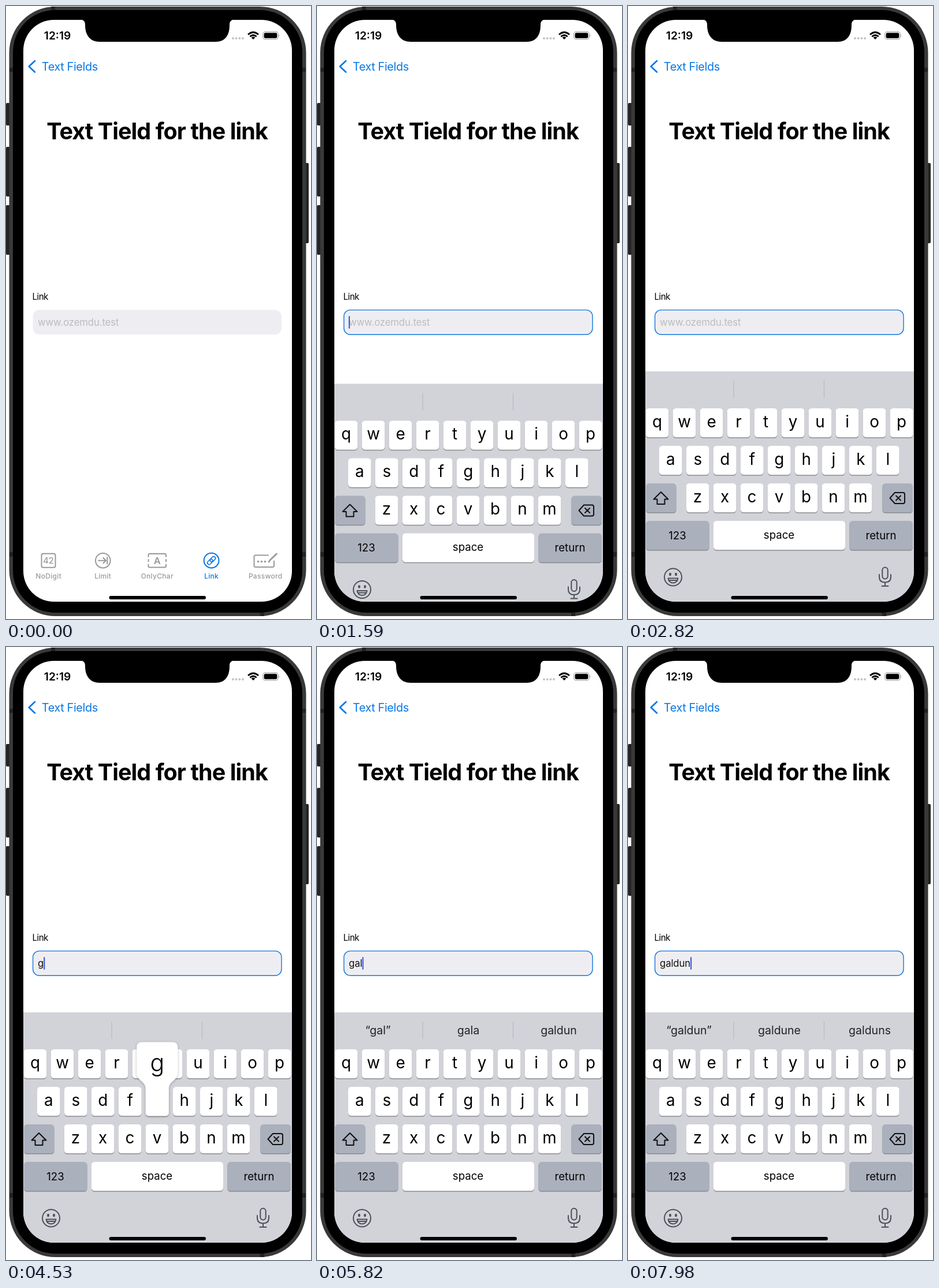
These frames come from a looping animation (528 by 1062 pixels, 8 s). An HTML page:

```html
<!DOCTYPE html>
<html lang="en">
<head>
<meta charset="utf-8">
<title>Link field</title>
<style>
  html, body { margin: 0; width: 100%; height: 100%; overflow: hidden; background: #fff; }
  svg { display: block; width: 100vw; height: 100vh; }
  text { font-family: Inter, Roboto, sans-serif; font-optical-sizing: none; white-space: pre; }
  .mid { text-anchor: middle; }
  .line { fill: none; stroke-linecap: round; stroke-linejoin: round; }
  .title { font-size: 39.5px; font-weight: 700; letter-spacing: -.94px; }
  .back { font-size: 19.8px; letter-spacing: -.35px; fill: #0877e6; }
  .input { font-size: 16.7px; letter-spacing: -.1px; }
  .tab { font-size: 12px; font-weight: 500; letter-spacing: .3px; }
  .key { font-size: 27.8px; font-weight: 400; }
  .word { font-size: 18.6px; }
  .hint { font-size: 19.5px; fill: #222; }
</style>
</head>
<body>
<svg viewBox="0 0 528 1062" preserveAspectRatio="none">
  <defs>
    <clipPath id="screen"><rect x="30" y="24" width="465" height="1008" rx="53"/></clipPath>
    <filter id="soft" x="-30%" y="-30%" width="160%" height="160%">
      <feDropShadow dx="0" dy="1" stdDeviation="2" flood-color="#000" flood-opacity=".3"/>
    </filter>
  </defs>

  <!-- phone body -->
  <g fill="#242424">
    <rect x="0" y="168" width="9" height="39" rx="2"/>
    <rect x="0" y="244" width="9" height="86" rx="2"/>
    <rect x="0" y="345" width="9" height="86" rx="2"/>
    <rect x="515" y="272" width="9" height="139" rx="2"/>
  </g>
  <rect x="5.5" y="1" width="514" height="1056" rx="80" fill="#393939"/>
  <path d="M6 107h7v7h-7zM6 946h7v8h-7zM512 107h7v7h-7zM512 946h7v8h-7zM78 1h7v6h-7zM440 1051h7v6h-7z" fill="#222"/>
  <rect x="12" y="7" width="501" height="1044" rx="73"/>
  <rect x="30" y="24" width="465" height="1008" rx="53" fill="#fff"/>
  <path d="M128 23C134.500 24 137 26.500 137 33C137 51 146 62 162 62H363C379 62 387 51 387 33C387 26.500 389.500 24 396 23z"/>

  <!-- status bar -->
  <text x="65.800" y="58" font-size="19.200" font-weight="600">12:19</text>
  <g fill="#c4c4c6">
    <circle cx="393" cy="56" r="2"/><circle cx="398.700" cy="56" r="2"/>
    <circle cx="404.400" cy="56" r="2"/><circle cx="410" cy="56" r="2"/>
  </g>
  <g fill="none" stroke="#000" stroke-width="2.700">
    <path d="M419 49.500Q428 41.500 437 49.500M422.300 53Q428 48 433.700 53"/>
  </g>
  <path d="M428 58l-3.400-3.500Q428 52 431.400 54.500z"/>
  <rect x="444.700" y="44.700" width="26.500" height="13" rx="4" fill="none" stroke="#a5a5a7" stroke-width="1.200"/>
  <rect x="446.600" y="46.600" width="22.700" height="9.200" rx="2.300"/>
  <path d="M472.500 49q2 2.200 0 4.500z" fill="#a5a5a7"/>

  <!-- page -->
  <path class="line" d="M50 95L39.700 104.700L50 114.400" stroke="#0877e6" stroke-width="2.700"/>
  <text class="back" x="61.800" y="112">Text Fields</text>
  <text class="title mid" x="261.500" y="231">Text Tield for the link</text>
  <text x="45.500" y="509" font-size="15.200" letter-spacing="-.55">Link</text>
  <rect id="field" x="46.600" y="526.600" width="430.400" height="42.600" rx="11" fill="#eeeef2" stroke-width="1.400"/>
  <text id="input" class="input" x="55" y="554"></text>
  <rect id="caret" y="537" width="2.200" height="22" rx="1" fill="#3f62d6"/>

  <!-- tab bar -->
  <g class="line" stroke="#999" stroke-width="2">
    <rect x="61.500" y="948.700" width="24" height="24" rx="3"/>
    <circle cx="167.800" cy="960.700" r="12.800"/>
    <path d="M160 960.700h13M168.300 956l4.700 4.700l-4.700 4.700M175.300 955v11.500"/>
    <path d="M246.500 954v-3q0-2 2-2h26.500q2 0 2 2v3M246.500 967.500v3q0 2 2 2h26.500q2 0 2-2v-3M246.500 959v3.500M277 959v3.500"/>
    <path d="M454 951.500h-22q-2.500 0-2.500 2.500v15.500q0 2.500 2.500 2.500h29.500q2.500 0 2.500-2.500v-8"/>
    <path d="M455 963l2.500-3.500l11-10.500" stroke-width="2.800"/>
  </g>
  <g class="line" stroke="#0877e6" stroke-width="2">
    <circle cx="355.600" cy="960.700" r="12.900"/>
    <g transform="translate(355.600 960.700) rotate(-45)" stroke-width="1.600">
      <rect x="-8.500" y="-3" width="10.500" height="6" rx="3"/>
      <rect x="-2" y="-3" width="10.500" height="6" rx="3"/>
    </g>
  </g>
  <g fill="#999" class="mid">
    <text x="73.500" y="966" font-size="14.500" font-weight="500">42</text>
    <text x="261.700" y="966.500" font-size="16.500" font-weight="600">A</text>
    <circle cx="436.500" cy="962.500" r="1.800"/><circle cx="442.500" cy="962.500" r="1.800"/><circle cx="448.500" cy="962.500" r="1.800"/>
    <text class="tab" x="73.700" y="992">NoDigit</text>
    <text class="tab" x="167.700" y="992">Limit</text>
    <text class="tab" x="261.700" y="992">OnlyChar</text>
    <text class="tab" x="355.600" y="992" fill="#0877e6">Link</text>
    <text class="tab" x="449.200" y="992">Password</text>
  </g>

  <g clip-path="url(#screen)"><g id="board"></g></g>
  <rect x="178.500" y="1022" width="167.500" height="6" rx="3"/>
</svg>
<script>
const $ = id => document.getElementById(id);
const LOOP = 8000, STEP = 30, FOCUS = 1290, SLIDE = 1386.5;
const PLACEHOLDER = 'www.ozemdu.test', WORD = 'galdun';
const presses = [4350, 4950, 5400, 6120, 6750, 7320];
const hints = [
  ['', '', ''],
  ['“g”', 'good', 'great'],
  ['“ga”', 'game', 'gave'],
  ['“gal”', 'gala', 'galdun'],
  ['“gald”', 'galdun', 'galduns'],
  ['“galdu”', 'galdun', 'galduns'],
  ['“galdun”', 'galdune', 'galduns']
];
const rows = [['qwertyuiop', 50.5], ['asdfghjkl', 73.8], ['zxcvbnm', 120.5]];

const keys = {};
const text = (cls, x, y, s, id = '') => `<text class="${cls} mid" x="${x}" y="${y}" id="${id}">${s}</text>`;
const key = (x, y, w, fill = '#fff') =>
  `<rect x="${x}" y="${y + 1.3}" width="${w}" height="50.5" rx="5.5" fill="#898b90"/>
   <rect x="${x}" y="${y}" width="${w}" height="50.3" rx="5.5" fill="${fill}"/>`;

function buildBoard() {
  const gray = '#abb0bd';
  let out = '<rect x="30" y="633" width="465" height="430" fill="#d2d3d9"/>' +
    '<path d="M183 649v30M339.5 649v30" stroke="#b9bac1" stroke-width="1.2"/>';
  [105.5, 262, 418.5].forEach((x, i) => out += text('hint', x, 671, '', 'hint' + i));
  rows.forEach(([letters, start], r) => [...letters].forEach((ch, i) => {
    const x = start + i * 47, y = 697 + r * 65;
    keys[ch] = { x, bottom: y + 50.5 };
    out += key(x - 19.8, y, 39.6) + text('key', x, y + 32.5, ch);
  }));
  out += key(31, 827, 52.5, gray) + key(440.3, 827, 52.7, gray) +
    key(31, 892, 109.5, gray) + key(148, 892, 228) + key(383.3, 892, 109.7, gray) +
    text('word', 85.5, 924, '123') + text('word', 261.5, 922.5, 'space') + text('word', 438, 924, 'return');
  out += `<g class="line" stroke="#111" stroke-width="2">
    <path d="M57 842l12.5 12.5h-6v8.5h-13v-8.5h-6z"/>
    <path d="M462 843h14q3 0 3 3v13q0 3-3 3h-14l-8.5-9.5zM464 848.5l8 8m0-8l-8 8"/></g>
    <g class="line" stroke="#4d5056" stroke-width="2">
    <circle cx="78" cy="989.5" r="15"/>
    <path d="M69.5 991.5h17q-1.5 8-8.5 8t-8.5-8zM70.5 995h15"/>
    <rect x="440.3" y="972.5" width="9.4" height="20" rx="4.7"/>
    <path d="M435 985v4q0 9.5 10 9.5t10-9.5v-4M445 998.5v6.5M439.5 1005h11"/></g>
    <ellipse cx="73" cy="984.5" rx="2" ry="2.7" fill="#4d5056"/>
    <ellipse cx="83" cy="984.5" rx="2" ry="2.7" fill="#4d5056"/>
    <g id="popup"><path filter="url(#soft)" fill="#fff" d="M-35.5-119q0-9 9-9h53q9 0 9 9v44
      c0 14-15.5 14-15.5 28v41q0 6-6 6h-28q-6 0-6-6v-41c0-14-15.5-14-15.5-28z"/>
      <text id="big" class="mid" y="-77.5" font-size="41" font-weight="300"></text></g>`;
  $('board').innerHTML = out;
}

function caretAlpha(t) {
  if (t < FOCUS) return 0;
  if (t < 1770 || t >= 4290) return 1;
  const p = (t - 1770) % 840;
  return p < 210 ? 1 - p / 210 : p < 300 ? 0 : Math.min(1, (p - 300) / 90);
}

// critically damped rise from below the screen
function boardOffset(t) {
  const u = Math.max(0, t - SLIDE) * 0.0229;
  return 401 * (1 + u) * Math.exp(-u);
}

const passed = (t, delay) => presses.filter(p => t >= p + delay).length;

function draw(t) {
  const typed = WORD.slice(0, passed(t, 120));
  const input = $('input');
  input.textContent = typed || PLACEHOLDER;
  input.setAttribute('fill', typed ? '#111' : '#bcbcc0');
  $('caret').setAttribute('x', typed ? 55 + input.getComputedTextLength() : 54.8);
  $('caret').setAttribute('opacity', caretAlpha(t));
  $('field').setAttribute('stroke', t < FOCUS ? 'none' : '#1677dd');
  $('board').setAttribute('transform', `translate(0 ${boardOffset(t).toFixed(2)})`);
  hints[passed(t, 330)].forEach((s, i) => $('hint' + i).textContent = s);

  const n = presses.findIndex(p => t >= p && t < p + 210);
  $('popup').style.display = n < 0 ? 'none' : '';
  if (n >= 0) {
    const { x, bottom } = keys[WORD[n]];
    $('popup').setAttribute('transform', `translate(${x} ${bottom})`);
    $('big').textContent = WORD[n];
  }
}

buildBoard();
const began = performance.now();
function frame() {
  const t = (performance.now() - began) % LOOP;
  draw(Math.floor(t / STEP) * STEP);
  requestAnimationFrame(frame);
}
frame();
</script>
</body>
</html>
```
